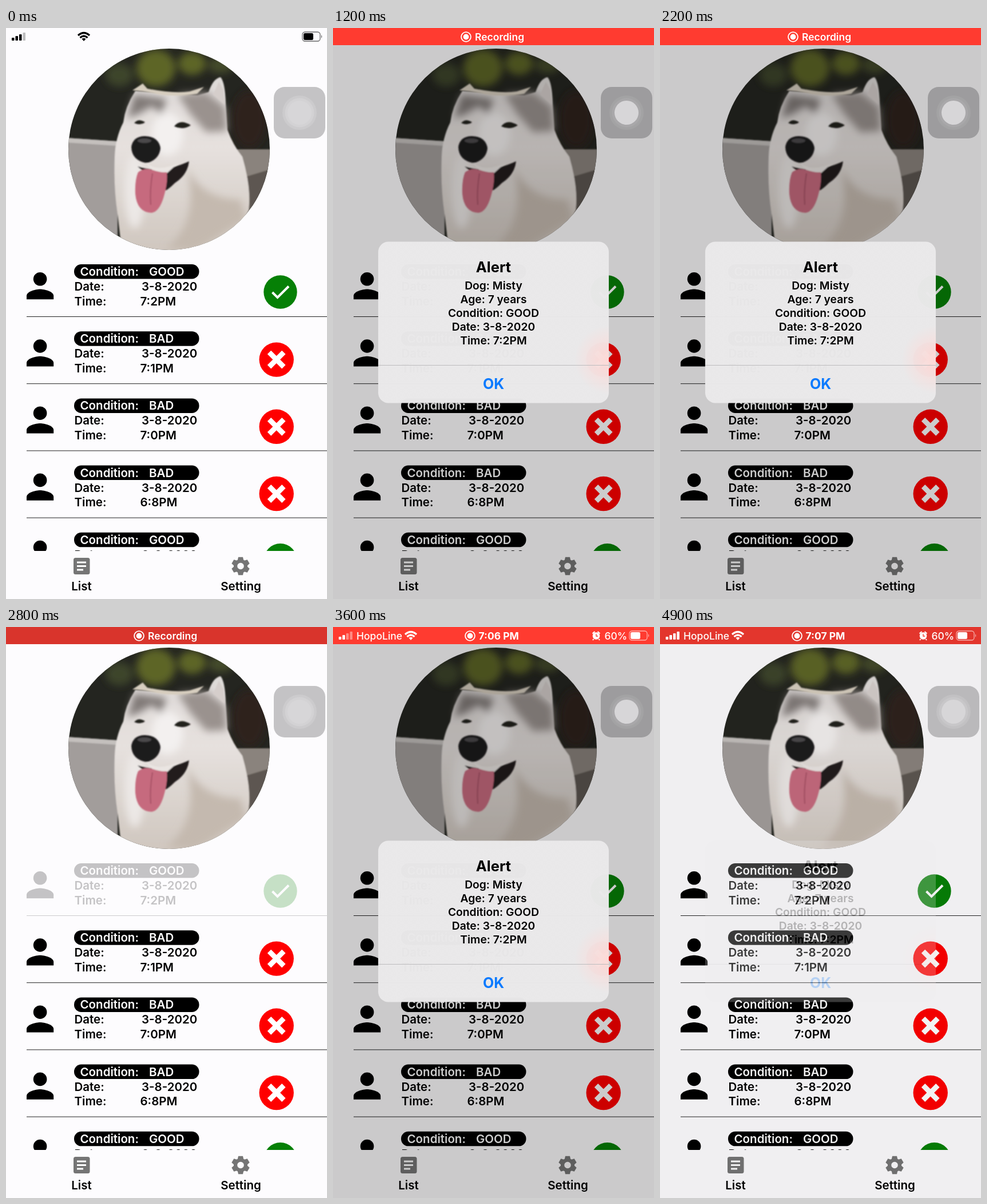
Animation of 561x998 px, one loop 5 s. Source, as an HTML page:

```html
<!DOCTYPE html>
<html lang="en">
<head>
<meta charset="utf-8">
<title>Dog log</title>
<style>
  html, body { margin: 0; width: 100%; height: 100%; overflow: hidden; background: #fdfcfe; }
  svg { display: block; width: 100vw; height: 100vh; }
  text { font: 600 20.5px Inter, Roboto, sans-serif; }
  .mid { text-anchor: middle; }
  #status text { font-size: 17.5px; fill: #fff; }
  #alert text { font-size: 19.3px; text-anchor: middle; }
  #alert .title { font-size: 25.5px; font-weight: 700; }
  #alert .ok { font-size: 25px; font-weight: 700; fill: #0a7aff; }
</style>
</head>
<body>
<svg viewBox="0 0 561 998" preserveAspectRatio="none">
  <defs>
    <clipPath id="round"><circle cx="285" cy="212" r="176"/></clipPath>
    <filter id="soft"><feGaussianBlur stdDeviation="1.2"/></filter>
    <filter id="softer" x="-50%" y="-50%" width="200%" height="200%"><feGaussianBlur stdDeviation="7"/></filter>
    <linearGradient id="fur" x1="0" y1="0" x2="0" y2="1">
      <stop offset="0" stop-color="#dedad8"/><stop offset=".4" stop-color="#e6e1de"/><stop offset="1" stop-color="#cfc6be"/>
    </linearGradient>
    <radialGradient id="glow" gradientUnits="userSpaceOnUse" cx="482" cy="580" r="60">
      <stop offset="0" stop-color="#ffd9d6"/><stop offset="1" stop-color="#eae9ea"/>
    </radialGradient>
    <g id="person" transform="translate(24.2 415.2) scale(2.95)">
      <circle cx="12" cy="8" r="4"/>
      <path d="M12 14c-2.67 0-8 1.34-8 4v2h16v-2c0-2.66-5.33-4-8-4z"/>
    </g>
    <g id="GOOD">
      <circle cx="479.5" cy="461.5" r="29.2" fill="#068006"/>
      <path d="M465.500 462l9 9 19.500-19.500" fill="none" stroke="#fff" stroke-width="4"/>
    </g>
    <g id="BAD">
      <circle cx="472.700" cy="462.400" r="30.200" fill="#f00"/>
      <path d="M460 449.700l25.400 25.400m0-25.400l-25.400 25.400" stroke="#fff" stroke-width="9"/>
    </g>
    <g id="signal" transform="translate(10 0)">
      <rect y="17" width="4.500" height="5" rx="1"/><rect x="6.500" y="14" width="4.500" height="8" rx="1"/>
      <rect class="weak" x="13" y="11" width="4.500" height="11" rx="1"/>
      <rect class="weak" x="19.500" y="8" width="4.500" height="14" rx="1"/>
    </g>
    <g id="wifi" fill="none" stroke="currentColor" stroke-width="3.300">
      <path d="M126 13q10-9 20 0M129.500 17q6.500-6 13 0"/>
      <path d="M136 23l-3.500-4q3.500-2.600 7 0z" fill="currentColor" stroke="none"/>
    </g>
    <g id="battery">
      <rect x="518" y="7" width="31" height="16" rx="4.500" fill="none" stroke="currentColor" stroke-width="1.300" opacity=".6"/>
      <rect x="520" y="9" width="17" height="12" rx="2.500" fill="currentColor"/>
      <path d="M551 12q2.500 3 0 6z" fill="currentColor" opacity=".6"/>
    </g>
    <g id="dot"><circle r="8.400" fill="none" stroke="#fff" stroke-width="1.900"/><circle r="4.900" fill="#fff"/></g>
  </defs>

  <rect width="561" height="998" fill="#fdfcfe"/>

  <g clip-path="url(#round)">
    <rect x="105" y="30" width="360" height="364" fill="#242520"/>
    <g filter="url(#softer)">
      <g fill="#5d6528">
        <ellipse cx="262" cy="70" rx="34" ry="32"/><ellipse cx="325" cy="62" rx="24" ry="20"/>
        <ellipse cx="198" cy="82" rx="24" ry="20" fill="#3d4529"/><ellipse cx="375" cy="65" rx="22" ry="14" fill="#444c2c"/>
      </g>
      <ellipse cx="425" cy="160" rx="30" ry="50" fill="#2e231f"/>
    </g>
    <g filter="url(#soft)">
      <path d="M105 192l90 6v196h-90z" fill="#a29d9b"/>
      <path d="M105 192l90 6v8l-90-6z" fill="#c4c0bd"/>
      <path d="M398 212h66v100h-60z" fill="#8a837d"/>
      <path d="M412 262l50-15v80h-42z" fill="#5d5751"/>
      <path d="M226 110Q208 138 205 165Q191 192 190 225Q188 280 195 325L203 394H390L424 318Q429 280 413 225Q397 205 387 178L384 132Q383 95 375 86Q362 88 354 112L335 118Z" fill="url(#fur)"/>
    </g>
    <g filter="url(#softer)">
      <path d="M224 116L212 158 232 150 256 136 272 152 280 124z" fill="#817a78"/>
      <path d="M300 116L322 150 350 182 386 180 383 138 350 112z" fill="#9a928e"/>
      <path d="M315 240Q340 300 410 300L420 335 330 390 280 385Q340 340 315 240z" fill="#c4b9af"/>
      <ellipse cx="225" cy="285" rx="18" ry="65" fill="#ece8e6"/>
      <ellipse cx="282" cy="185" rx="28" ry="38" fill="#f3f0ef"/>
    </g>
    <g filter="url(#soft)">
      <path d="M362 116l10-22 8 14 2 26z" fill="#d5cecb"/>
      <path d="M221 109l18-12 8 9q45 9 74 5l25-8-12 12q-36 6-68 1-24-6-45-7z" fill="#d7cebf"/>
      <path d="M224 166q8-9 19-1-8 6-19 1z" fill="#24201f"/>
      <path d="M294 172q10-14 29-2-13 9-29 2z" fill="#24201f"/>
      <path d="M230 242q40 14 90-9-3 24-25 38-10 10-16 13-20-20-49-42z" fill="#201b1c"/>
      <path d="M244 234q20 20 57 2l-20 18q-24 4-37-20z" fill="#eae5e2"/>
      <path d="M231 252q10-8 25-4 13 5 25 4 2 18-5 42-8 28-22 29-25-1-28-33-1-25 5-38z" fill="#c66b7e"/>
      <path d="M256 254q-5 30-3 55" fill="none" stroke="#a64f65" stroke-width="2"/>
      <path d="M219 208q3-19 24-19 24 1 27 21-2 20-24 26-26-4-27-28z" fill="#1d1a1c"/>
      <ellipse cx="242" cy="197" rx="12" ry="4" fill="#4b484b"/>
    </g>
  </g>

  <g id="rows"></g>

  <rect y="914" width="561" height="84" fill="#fdfcfe"/>
  <rect x="118" y="926" width="28.500" height="29" rx="3.500" fill="#757575"/>
  <path d="M124 934h16M124 940.500h16M124 947h11" stroke="#fff" stroke-width="3"/>
  <g id="gear" transform="translate(410 940.500)" fill="#757575">
    <circle r="8.900" fill="none" stroke="#757575" stroke-width="6.200"/>
  </g>
  <text class="mid" x="132" y="983">List</text>
  <text class="mid" x="410.500" y="983">Setting</text>

  <rect x="468" y="103" width="90" height="90" rx="19" fill="#c4c3c5"/>
  <circle cx="513" cy="148" r="30" fill="#fff" opacity=".13"/>
  <circle cx="513" cy="148" r="25.500" fill="#fff" opacity=".13"/>
  <rect id="dim" width="561" height="998"/>
  <circle cx="513" cy="148" r="21" fill="#d7d6d8"/>

  <g id="idle" color="#000">
    <rect width="561" height="30" fill="#fdfcfe"/>
    <g transform="translate(10 0)">
      <rect y="17" width="4.500" height="5" rx="1"/><rect x="6.500" y="14" width="4.500" height="8" rx="1"/>
      <rect x="13" y="11" width="4.500" height="11" rx="1"/><rect x="19.500" y="8" width="4.500" height="14" rx="1" opacity=".25"/>
    </g>
    <use href="#wifi"/><use href="#battery"/>
  </g>

  <g id="status">
    <rect id="bar" width="561" height="30"/>
    <g id="recording">
      <use href="#dot" x="232.500" y="15.500"/><text x="248" y="21.700">Recording</text>
    </g>
    <g id="full" color="#fff" fill="#fff">
      <use href="#signal"/>
      <text x="41" y="21.700" style="font-weight:500">HopoLine</text>
      <use href="#wifi"/>
      <use href="#dot" x="239.500" y="15.500"/>
      <text id="clock" x="254.500" y="21.700" style="font-weight:700"></text>
      <circle cx="460" cy="15.500" r="6.300"/>
      <path d="M453.500 11.500l4-3.500M466.500 11.500l-4-3.500M455.500 21l-1.500 2M464.500 21l1.500 2" stroke="#fff" stroke-width="2"/>
      <path d="M460 12v4h3" fill="none" stroke="#f33b30" stroke-width="1.300"/>
      <text x="474.500" y="21.700" style="font-weight:500">60%</text>
      <use href="#battery"/>
    </g>
  </g>

  <g id="alert">
    <rect x="79" y="373.500" width="403" height="282" rx="18" fill="url(#glow)" fill-opacity=".985"/>
    <text class="title" x="280.500" y="427">Alert</text>
    <path d="M79 589.500h403" stroke="#bdbcbe"/>
    <text class="ok" x="280.500" y="631">OK</text>
  </g>
</svg>
<script>
const $ = id => document.getElementById(id);
const clamp = x => Math.min(1, Math.max(0, x));
const ramp = (t, start, length) => clamp((t - start) / length);
const shows = [[1020, 2200], [2820, 4800]];

const entries = [['GOOD', '7:2PM'], ['BAD', '7:1PM'], ['BAD', '7:0PM'], ['BAD', '6:8PM'], ['GOOD', '6:7PM']];
$('rows').innerHTML = entries.map(([state, time], i) => `
  <g transform="translate(0 ${i * 117.2})">
    <use href="#person"/>
    <rect x="119" y="413" width="218.5" height="25.500" rx="12.500"/>
    <g fill="#fff"><text x="129.500" y="433">Condition:</text><text x="250" y="433">${state}</text></g>
    <text x="119.500" y="459">Date:</text><text x="237" y="459">3-8-2020</text>
    <text x="119.500" y="484.500">Time:</text><text x="234.500" y="484.500">${time}</text>
    <use href="#${state}"/>
    <path d="M36 504.500h525" stroke="#222"/>
  </g>`).join('');

for (let a = 0; a < 360; a += 60)
  $('gear').innerHTML += `<path d="M-5.500-9l1.500-6.800h8l1.500 6.800z" transform="rotate(${a})"/>`;

['Dog: Misty', 'Age: 7 years', 'Condition: GOOD', 'Date: 3-8-2020', 'Time: 7:2PM'].forEach((line, i) =>
  $('alert').innerHTML += `<text x="280.500" y="${457 + 24 * i}">${line}</text>`);

const firstRow = $('rows').firstElementChild;
const weakBars = document.querySelectorAll('.weak');
const show = (id, on) => $(id).style.display = on ? '' : 'none';

function draw(t) {
  let alpha = 0, scale = 1, press = 0;
  for (const [open, close] of shows) {
    const grow = 1 - (1 - ramp(t, open, 180)) ** 2;
    const here = grow * (1 - ramp(t, close, 200)) ** 2;
    if (here > alpha) { alpha = here; scale = 1.15 - .15 * grow; }
    press = Math.max(press, ramp(t, open - 120, 100) - ramp(t, open + 30, 150));
  }
  firstRow.setAttribute('opacity', 1 - .78 * press);
  $('dim').setAttribute('opacity', .2 * alpha);
  $('alert').setAttribute('opacity', alpha);
  $('alert').setAttribute('transform', `translate(280.500 514.500) scale(${scale}) translate(-280.500 -514.500)`);
  $('bar').setAttribute('fill', `rgb(${217 + 38 * alpha},${52 + 7 * alpha},${44 + 4 * alpha})`);

  show('idle', t < 300);
  show('status', t >= 300);
  show('recording', t < 3200);
  show('full', t >= 3200);
  $('clock').textContent = t < 4000 ? '7:06 PM' : '7:07 PM';
  weakBars.forEach(bar => bar.setAttribute('opacity', t < 4000 ? .4 : 1));
}

function tick() {
  draw(Math.floor(performance.now() % 5000 / 100) * 100);
  requestAnimationFrame(tick);
}
tick();
</script>
</body>
</html>
```
